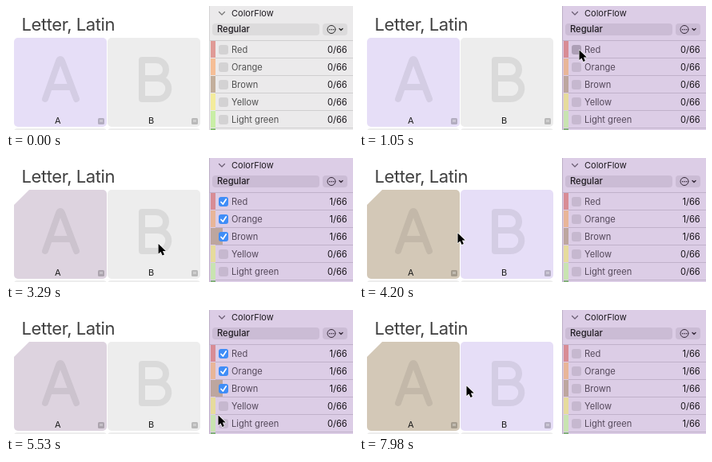
These frames come from a looping animation (434 px wide and 156 px high, 8 s). An HTML page with a canvas:

```html
<!DOCTYPE html>
<html lang="en">
<head>
<meta charset="utf-8">
<title>Colour checklist</title>
<style>
html, body { margin: 0; width: 434px; height: 156px; overflow: hidden; background: #fff; }
canvas { display: block; }
</style>
</head>
<body>
<canvas id="stage" width="434" height="156"></canvas>
<script>
const ctx = document.getElementById('stage').getContext('2d');
const LOOP = 8000, STEP = 70, PRESS = 140, LAG = 140;
const FONT = 'Inter, Roboto, sans-serif';

// label, plain bar, tinted bar, time of the tick
const ROWS = [
  ['Red', '#e09a96', '#d88c95', 1120],
  ['Orange', '#f5be96', '#e8b598', 2030],
  ['Brown', '#c3af9b', '#bda69f', 2400],
  ['Yellow', '#f3ec9b', '#e6db9c', Infinity],
  ['Light green', '#c8eea5', '#c9e4b1', 6020]
];

// card fill while selected: none, red, orange, brown
const SELECTED = ['#e6def7', '#e6d6dc', '#ebdcd9', '#ddd3df'];
const BROWN = '#d3c8b7', LAVENDER = '#e6def7', PLAIN = '#ededed';

// time, x, y of the pointer tip
const PATH = [
  [70, 250, 158], [700, 262, 112], [840, 262, 112], [1050, 275, 55],
  [1540, 275, 56], [1890, 274, 77], [2030, 275, 79], [2100, 276, 83],
  [2310, 275, 100], [2660, 275, 102], [3430, 182, 108], [3780, 180, 108],
  [4200, 123, 94], [4410, 92, 98], [4970, 90, 98], [5530, 265, 132],
  [5740, 271, 141], [6230, 271, 141], [6650, 257, 132], [7000, 172, 108],
  [7630, 168, 108], [7980, 134, 95]
];

const clamp = v => Math.max(0, Math.min(1, v));
const ease = v => v * v * (3 - 2 * v);

function mix(a, b, k) {
  const part = (c, i) => parseInt(c.substr(1 + i * 2, 2), 16);
  return `rgb(${[0, 1, 2].map(i => Math.round(part(a, i) + (part(b, i) - part(a, i)) * k))})`;
}

function rect(x, y, w, h, color) {
  ctx.fillStyle = color;
  ctx.fillRect(x, y, w, h);
}

function round(x, y, w, h, r, color) {
  ctx.fillStyle = color;
  ctx.beginPath();
  ctx.roundRect(x, y, w, h, r);
  ctx.fill();
}

function line(d, color, width) {
  ctx.strokeStyle = color;
  ctx.lineWidth = width;
  ctx.lineCap = ctx.lineJoin = 'round';
  ctx.stroke(new Path2D(d));
}

function text(s, x, y, size, color, { align = 'left', spacing = 0, weight = 400 } = {}) {
  ctx.font = `${weight} ${size}px ${FONT}`;
  ctx.letterSpacing = spacing + 'px';
  ctx.textAlign = align;
  ctx.fillStyle = color;
  ctx.fillText(s, x, y);
}

function card(x, color, letter, shape, cut) {
  ctx.save();
  if (cut) {
    ctx.beginPath();
    ctx.moveTo(x + 19, 40);
    for (const [dx, y] of [[116, 40], [116, 153], [0, 153], [0, 59]]) ctx.lineTo(x + dx, y);
    ctx.clip();
  }
  round(x, 40, 116, 112, 5, color);
  ctx.restore();
  line(shape, 'rgba(0,0,0,.08)', 8);
  text(letter, x + 54.7, 148, 11, '#1c1c1c', { align: 'center' });
  round(x + 105, 141, 8, 8, 1.5, 'rgba(0,0,0,.22)');
  rect(x + 107, 143, 4, 3, 'rgba(255,255,255,.3)');
  round(x, 154, 116, 8, 4, PLAIN);
}

function page(stage, picked) {
  rect(0, 0, 254, 156, '#fff');
  text('Letter, Latin', 19.5, 31, 22, '#404040', { spacing: -0.42 });
  card(10, picked ? SELECTED[stage] : BROWN, 'A',
    'M49 117L66 69Q68 65 70 69L88 117M55 102H82', stage > 0);
  card(127, picked ? PLAIN : LAVENDER, 'B',
    'M170 68V117H189C208 117 208 91 189 91H170M189 91C204 91 204 68 187 68H170', false);
}

function checkbox(y, on, color) {
  round(266, y - 6, 12, 12, 3, on ? '#3f8df7' : color);
  if (on) line(`M269 ${y + .5}L271.3 ${y + 3}L275.2 ${y - 3}`, '#fff', 1.7);
}

function panel(t, stage, picked) {
  const k = clamp((t - 770) / 210);
  const tone = (a, b) => mix(a, b, k);
  const rule = tone('#cfcecf', '#c0b1ca');
  const field = tone('#dcdbdc', '#cbbcd5');
  const ink = tone('#2b2b2b', '#35293a');
  const soft = tone('#505050', '#54485a');

  rect(254, 0, 180, 156, tone('#ebeaeb', '#dccde6'));
  rect(254, 0, 1, 156, tone('#d4d3d4', '#bdaec6'));
  line('M266.5 7.5L270 11L273.5 7.5', tone('#777777', '#6b5d73'), 1.2);
  text('ColorFlow', 282, 13, 11, '#1f1b21');
  round(258, 22, 134, 15, 4, field);
  text('Regular', 264, 33, 11.2, '#1f1b21', { weight: 500 });

  round(396, 22, 31, 15, 4, field);
  ctx.beginPath();
  ctx.arc(407, 29.5, 5, 0, 7);
  ctx.strokeStyle = ink;
  ctx.lineWidth = 1;
  ctx.stroke();
  for (const x of [404, 406.4, 408.8]) rect(x, 29, 1.3, 1.3, ink);
  line('M417 28.5L419 30.5L421 28.5', ink, 1.4);

  rect(255, 43, 179, 1, rule);
  ROWS.forEach(([label, plain, tinted, at], i) => {
    const y = 55 + i * 22;
    const done = t >= at;
    const pressed = !done && t >= at - PRESS;
    const wide = picked && stage === i + 1;
    rect(256, y - 11, wide ? 15 : 6, 21, tone(plain, tinted));
    rect(262, y + 10, 172, 1, rule);
    checkbox(y, done && picked, pressed ? '#ad9fb6' : tone('#d3d2d3', '#c6b8cf'));
    text(label, 282, y + 4, 11.1, soft);
    text(done ? '1/66' : '0/66', 426.7, y + 4, 11.1, '#171318', { align: 'right' });
  });
  rect(256, 154, 6, 2, tone('#86bd72', '#82b079'));
}

function pointer(t) {
  if (t < PATH[0][0]) return;
  let i = 0;
  while (i < PATH.length - 2 && t > PATH[i + 1][0]) i++;
  const [t0, x0, y0] = PATH[i], [t1, x1, y1] = PATH[i + 1];
  const k = ease(clamp((t - t0) / (t1 - t0)));
  ctx.save();
  ctx.translate(x0 + (x1 - x0) * k + .5, y0 + (y1 - y0) * k + .5);
  ctx.scale(.9, .9);
  const arrow = 'M0 0V14L3.3 11L5.6 16.2L8.2 15L6 10H10.3Z';
  line(arrow, '#fff', 1.4);
  ctx.fillStyle = '#000';
  ctx.fill(new Path2D(arrow));
  ctx.restore();
}

// the flow advances through the unbroken run of ticks from the top
function flow(t) {
  const gap = ROWS.findIndex(row => t < row[3]);
  return gap < 0 ? ROWS.length : gap;
}

function draw(now) {
  const t = Math.floor(now % LOOP / STEP) * STEP;
  const picked = t < 3640 || (t >= 4480 && t < 7070);
  page(flow(t - LAG), picked);
  panel(t, flow(t), picked);
  pointer(t);
}

const start = performance.now();
function tick() {
  draw(performance.now() - start);
  requestAnimationFrame(tick);
}
tick();
</script>
</body>
</html>
```
